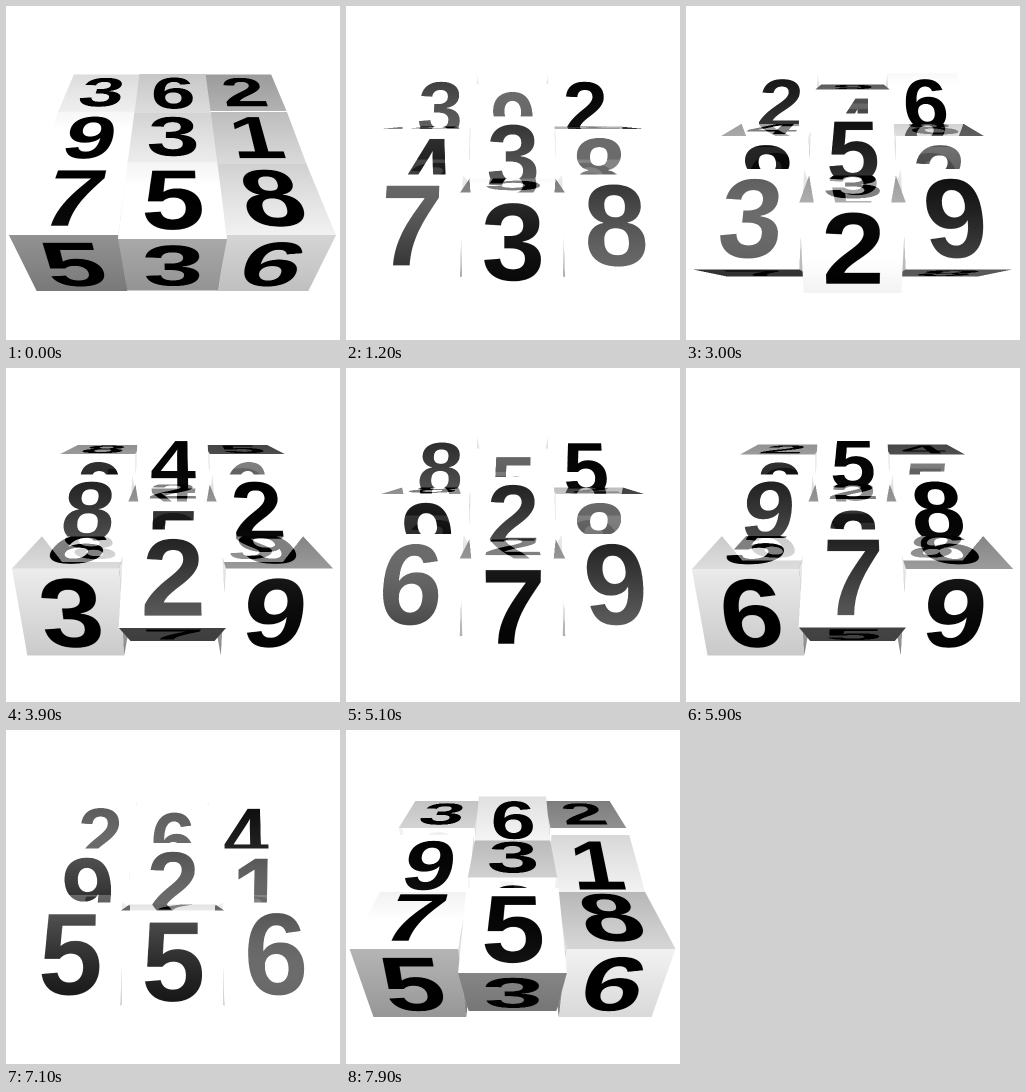
Write an HTML page with a canvas that moves like this. It is 334 px wide and 334 px high and loops after 8000 ms.

```html
<!DOCTYPE html>
<html lang="en">
<head>
<meta charset="utf-8">
<title>Rolling number cubes</title>
<style>
  html, body { margin: 0; width: 100%; height: 100%; overflow: hidden; background: #fff; }
  canvas { display: block; width: 100vw; height: 100vh; }
</style>
</head>
<body>
<canvas id="stage" width="668" height="668"></canvas>
<script>
const SIZE = 334, SCALE = 2, TEX = 256, LOOP = 8000;
const FOCAL = 361, MID_X = 166.5, MID_Y = 167, MIRROR = 0.5;
const RAD = Math.PI / 180;

// Points in the side view are [height, depth towards the viewer].
const dot = (a, b) => a[0] * b[0] + a[1] * b[1];
const along = (p, t, d) => [p[0] + t * d[0], p[1] + t * d[1]];
const pitch = 44 * RAD;
const camera = [3.223, 3.474];
const forward = [-Math.sin(pitch), -Math.cos(pitch)];
const down = [-Math.cos(pitch), Math.sin(pitch)];
const light = [4, 3.5];

// Digits that come to the top, one per quarter turn; rows from back to front.
const cubes = [
  ["3282", "6945", "2654"],
  ["9489", "3522", "1828"],
  ["7365", "5327", "8996"]
];
// Step of the loop and quarter-turn progress (20 units per quarter).
const turnKeys = [[0, -0.3], [55, 55], [67, 69], [75, 78]];

const ctx = document.getElementById("stage").getContext("2d");
ctx.scale(SCALE, SCALE);

function makeTile(digit, cutOut) {
  const tile = document.createElement("canvas");
  tile.width = tile.height = TEX;
  const pen = tile.getContext("2d");
  if (cutOut) {
    pen.fillStyle = "#fff";
    pen.fillRect(0, 0, TEX, TEX);
    pen.globalCompositeOperation = "destination-out";
  }
  pen.font = `bold ${TEX * 1.125}px "Liberation Sans", Arial, sans-serif`;
  pen.textAlign = "center";
  pen.fillText(digit, TEX * 0.508, TEX * 0.889);
  return tile;
}
const digits = Array.from("0123456789", d => makeTile(d, false));
const mirrored = Array.from("0123456789", d => makeTile(d, true));

const gray = level => {
  const c = Math.round(255 * Math.max(0, Math.min(1, level)));
  return `rgb(${c},${c},${c})`;
};

function turnAt(step) {
  const i = Math.max(1, turnKeys.findIndex(key => key[0] >= step));
  const [s0, v0] = turnKeys[i - 1], [s1, v1] = turnKeys[i];
  return (v0 + (v1 - v0) * (step - s0) / (s1 - s0)) * 4.5;
}

function facesOf(row, col, turn) {
  const rolls = (row + col) % 2 ? -1 : 1;
  return Array.from(cubes[row][col], (digit, i) => {
    const angle = (90 - rolls * (turn - 90 * i)) * RAD;
    return {
      digit, angle,
      normal: [Math.sin(angle), Math.cos(angle)],
      textDown: [-Math.cos(angle), Math.sin(angle)]
    };
  });
}

// Nearest and farthest crossing of a ray with one cube's square profile.
function cross(cube, start, ray) {
  const origin = [start[0], start[1] - cube.z];
  let near = -Infinity, far = Infinity, face = null;
  for (const f of cube.faces) {
    const rate = dot(f.normal, ray);
    const t = (0.5 - dot(f.normal, origin)) / rate;
    if (rate < 0 && t > near) { near = t; face = f; }
    if (rate > 0 && t < far) far = t;
  }
  if (near >= far || near < 0.001) return null;
  const local = along(origin, near, ray);
  const v = (dot(face.textDown, local) + 0.5) * TEX - 1;
  return {
    cube, near, far, face,
    point: along(start, near, ray),
    v: Math.max(0, Math.min(TEX - 2, v))
  };
}

// Light reaches the left column from higher up than the right one.
function shade({ point, face }, col) {
  const angleTo = p => Math.atan2(p[0] - point[0], p[1] - point[1]);
  const tilt = col * 9 * RAD;
  const toLight = angleTo(light);
  const half = (toLight + angleTo(camera)) / 2 - tilt;
  return {
    diffuse: 0.2 + 0.98 * Math.max(0, Math.cos(face.angle - toLight + tilt)),
    specular: 0.42 * Math.max(0, Math.cos(face.angle - half)) ** 20
  };
}

// The turning axis lies across the view, so a mirrored scanline only gets farther away.
function drawReflection(hit, column, col, ray, y, h) {
  const n = hit.face.normal;
  const bounced = along(ray, -2 * dot(n, ray), n);
  const seen = column.filter(cube => cube !== hit.cube)
    .map(cube => cross(cube, hit.point, bounced))
    .filter(Boolean)
    .sort((a, b) => a.near - b.near)[0];
  if (!seen) return;
  const w = FOCAL / hit.near, x = MID_X + (col - 0.5) * w;
  const rw = FOCAL / (hit.near + seen.near), rx = MID_X + (col - 0.5) * rw;
  const left = Math.max(x, rx), right = Math.min(x + w, rx + rw);
  if (right <= left) return;
  ctx.globalAlpha = MIRROR * Math.min(1, shade(seen, col).diffuse);
  ctx.drawImage(mirrored[seen.face.digit],
    (left - rx) / rw * TEX, seen.v, (right - left) / rw * TEX, 2,
    left, y, right - left, h);
  ctx.globalAlpha = 1;
}

function drawHit(hit, column, col, ray, y, h) {
  if (col) {
    const a = MID_X + FOCAL * 0.5 * col / hit.far;
    const b = MID_X + FOCAL * 0.5 * col / hit.near;
    ctx.fillStyle = gray(0.62 + 0.45 * hit.point[0]);
    ctx.fillRect(Math.min(a, b), y, Math.abs(b - a), h);
  }
  const w = FOCAL / hit.near;
  const x = MID_X + (col - 0.5) * w;
  const { diffuse, specular } = shade(hit, col);
  ctx.fillStyle = gray(diffuse);
  ctx.fillRect(x, y, w, h);
  ctx.drawImage(digits[hit.face.digit], 0, hit.v, TEX, 2, x, y, w, h);
  ctx.globalCompositeOperation = "lighter";
  ctx.fillStyle = gray(specular);
  ctx.fillRect(x, y, w, h);
  drawReflection(hit, column, col, ray, y, h);
  ctx.globalCompositeOperation = "source-over";
}

// Every cube turns about the horizontal axis, so each scanline has one depth per face.
function draw(step) {
  const turn = turnAt(step);
  ctx.fillStyle = "#fff";
  ctx.fillRect(0, 0, SIZE, SIZE);
  const h = 1 / SCALE;
  for (const col of [-1, 1, 0]) {
    const column = [0, 1, 2].map(row => ({ z: row - 1, faces: facesOf(row, col + 1, turn) }));
    for (let y = 60; y < 295; y += h) {
      const ray = along(forward, (y + h / 2 - MID_Y) / FOCAL, down);
      column.map(cube => cross(cube, camera, ray))
        .filter(Boolean)
        .sort((a, b) => b.near - a.near)
        .forEach(hit => drawHit(hit, column, col, ray, y, h));
    }
  }
}

let shown = -1;
function tick() {
  const t = performance.now() % LOOP;
  const step = t < 500 ? 0 : Math.floor((t - 500) / 100) + 1;
  if (step !== shown) draw(shown = step);
  requestAnimationFrame(tick);
}
tick();
</script>
</body>
</html>
```
